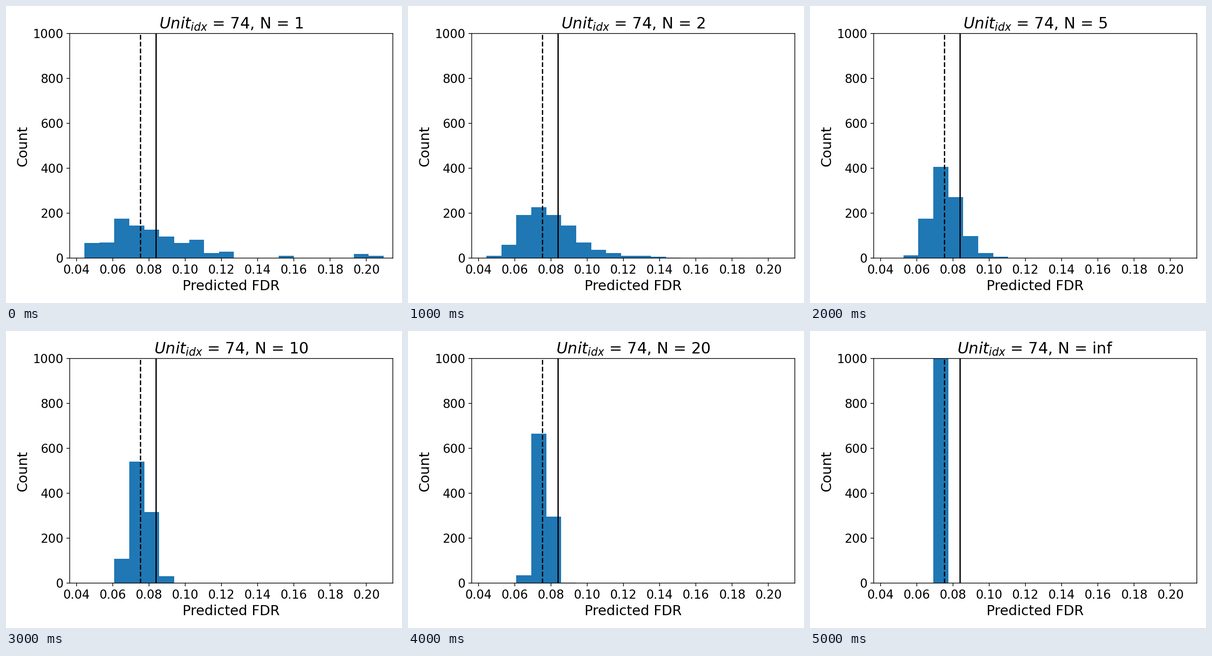
A matplotlib script that plays this animation: 864 by 648 pixels, repeating every 6000 ms.

```python
import numpy as np
import matplotlib.pyplot as plt
from matplotlib.animation import FuncAnimation

W, H, DPI = 864, 648, 135
plt.rcParams["font.family"] = "DejaVu Sans"

# Sample size, index of the first filled bin, counts per bin
STAGES = [
    ("1", 0, [68, 71, 177, 145, 128, 96, 69, 82, 24, 30,
              0, 0, 0, 10, 0, 0, 0, 0, 20, 11]),
    ("2", 0, [11, 60, 192, 228, 192, 146, 70, 38, 23, 11, 10, 6, 3, 1]),
    ("5", 1, [13, 177, 407, 273, 98, 24, 6]),
    ("10", 2, [108, 541, 318, 32]),
    ("20", 2, [36, 666, 296, 2]),
    ("inf", 3, [1000]),
]
BINS = 20
edges = np.linspace(0.0444, 0.2096, BINS + 1)

fig = plt.figure(figsize=(W / DPI, H / DPI), dpi=DPI, facecolor="white")
left, right, top, bottom = 138.6, 843.75, 60.2, 550.4
ax = fig.add_axes([left / W, 1 - bottom / H,
                   (right - left) / W, (bottom - top) / H])
ax.set_xlim(0.0362, 0.2146)
ax.set_ylim(0, 1000)
ax.set_xticks(np.arange(0.04, 0.21, 0.02))
ax.xaxis.set_major_formatter("{x:.2f}")
ax.tick_params(labelsize=14)
ax.set_xlabel("Predicted FDR", fontsize=16)
ax.set_ylabel("Count", fontsize=16)
title = ax.set_title("", fontsize=18)

bars = ax.bar(edges[:-1], np.zeros(BINS), width=np.diff(edges),
              align="edge", color="#1f77b4")
ax.axvline(0.07514, color="black", linestyle="--", linewidth=1.5)
ax.axvline(0.0838, color="black", linewidth=1.5)


def draw(i):
    size, first, filled = STAGES[i]
    counts = np.zeros(BINS)
    counts[first:first + len(filled)] = filled
    for bar, count in zip(bars, counts):
        bar.set_height(count)
    title.set_text(rf"$Unit_{{idx}}$ = 74, N = {size}")
    return [*bars, title]


anim = FuncAnimation(fig, draw, frames=len(STAGES), interval=1000,
                     init_func=lambda: draw(0), repeat=True, repeat_delay=0)
plt.show()
```
